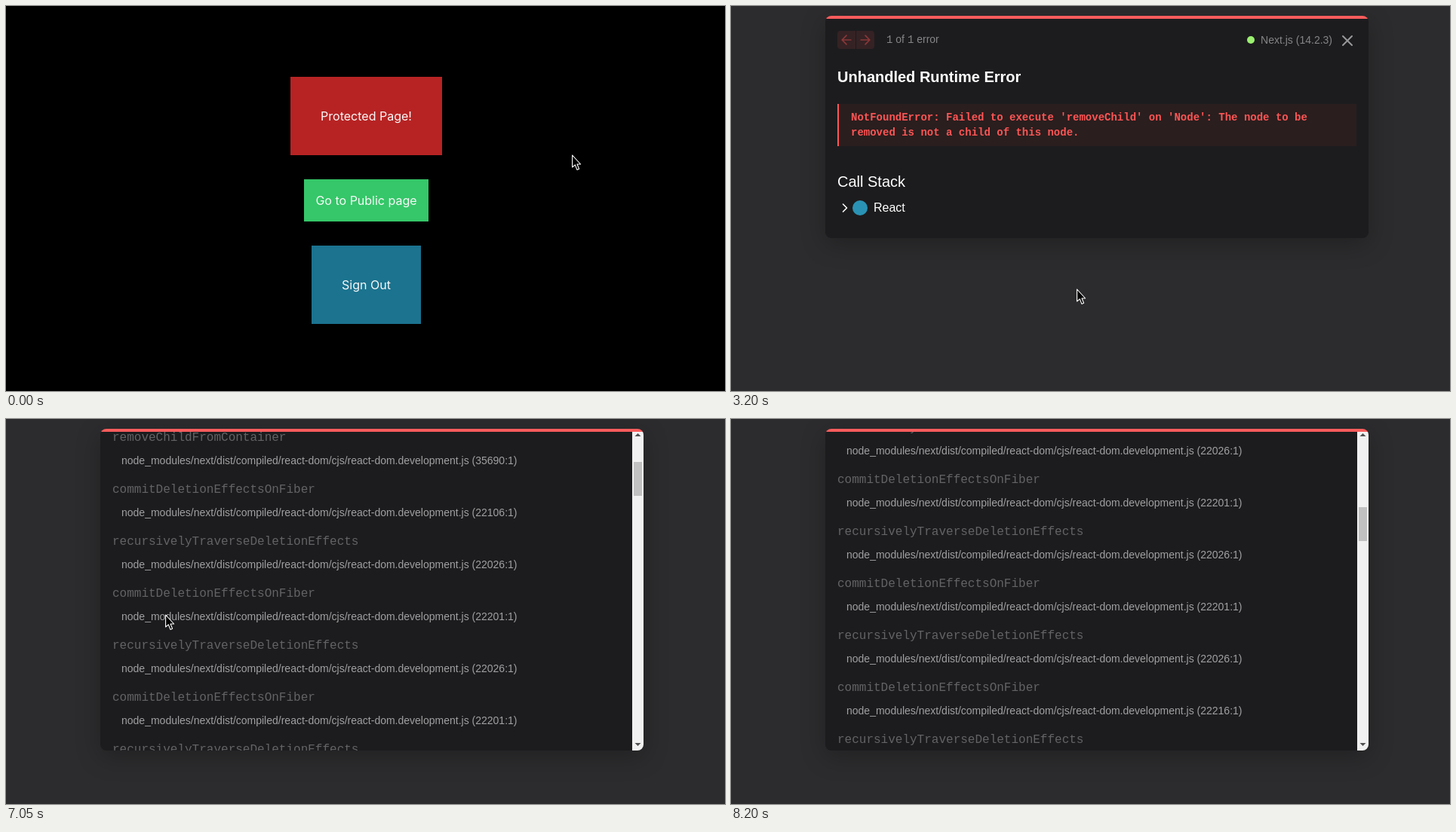
Recreate the animation shown at these times as an HTML page with a canvas. Size 953 by 511 pixels, loop 9050 ms.

```html
<!DOCTYPE html>
<html lang="en">
<head>
<meta charset="utf-8">
<title>Sign out error</title>
<style>
  html, body { margin: 0; width: 100%; height: 100%; overflow: hidden; background: #000; }
  canvas { display: block; }
</style>
</head>
<body>
<canvas id="stage" width="953" height="511"></canvas>
<script>
const ctx = document.getElementById('stage').getContext('2d');
const LOOP = 9050, STEP = 50;
const SANS = '"Liberation Sans", Arial, sans-serif';
const MONO = '"Liberation Mono", "Courier New", monospace';
const RED = '#ff5555', GREY = '#858587';

const smooth = p => p * p * (3 - 2 * p);
const progress = (t, from, to) => Math.min(1, Math.max(0, (t - from) / (to - from)));

function rect(x, y, w, h, color, radius = 0) {
  ctx.fillStyle = color;
  ctx.beginPath();
  ctx.roundRect(x, y, w, h, radius);
  ctx.fill();
}

function circle(x, y, r, color) {
  ctx.fillStyle = color;
  ctx.beginPath();
  ctx.arc(x, y, r, 0, 2 * Math.PI);
  ctx.fill();
}

function text(str, x, y, font, color, align = 'left') {
  ctx.font = font;
  ctx.fillStyle = color;
  ctx.textAlign = align;
  ctx.fillText(str, x, y);
}

function strokePath(d, x, y, color, width) {
  ctx.save();
  ctx.translate(x, y);
  ctx.strokeStyle = color;
  ctx.lineWidth = width;
  ctx.lineCap = ctx.lineJoin = 'round';
  ctx.stroke(new Path2D(d));
  ctx.restore();
}

// Page with three buttons

function drawPage() {
  const button = (label, x, y, w, h, color) => {
    rect(x, y, w, h, color);
    text(label, 477.5, y + h / 2 + 6, '16px Inter, sans-serif', '#f8f8f8', 'center');
  };
  button('Protected Page!', 377, 94, 201, 104, '#b72323');
  button('Go to Public page', 395, 230, 165, 56, '#35c769');
  button('Sign Out', 405, 318, 145, 104, '#1b738f');
}

// Error dialog

function drawHeader(right) {
  rect(141, 33, 24, 24, 'rgba(255,85,85,.11)', [4, 0, 0, 4]);
  rect(166, 33, 24, 24, 'rgba(255,85,85,.11)', [0, 4, 4, 0]);
  const arrowColor = 'rgba(255,85,85,.42)';
  strokePath('M0-5.8 -5.8 0 0 5.8M5.8 0H-5.8', 153, 45, arrowColor, 1.7);
  strokePath('M0-5.8 5.8 0 0 5.8M-5.8 0H5.8', 178, 45, arrowColor, 1.7);

  text('1', 206, 49, '14px ' + MONO, GREY);
  text('of', 218.3, 49, '14px ' + SANS, GREY);
  text('1', 233.9, 49, '14px ' + MONO, GREY);
  text('error', 246.2, 49, '14px ' + SANS, GREY);

  circle(right - 140, 45, 5, '#9bf070');
  text('Next.js (14.2.3)', right - 32, 50, '14px ' + SANS, GREY, 'right');
  strokePath('M-6-6 6 6M6-6 -6 6', right - 12, 46, '#98989a', 2);
}

function drawMessage(right) {
  text('Unhandled Runtime Error', 141, 101, 'bold 20px ' + SANS, '#fff');
  rect(141, 130, right - 141, 56, '#2a1e1e');
  rect(141, 130, 2, 56, RED);
  const bold = 'bold 14px ' + MONO;
  text("NotFoundError: Failed to execute 'removeChild' on 'Node': The node to be", 159, 152, bold, RED);
  text('removed is not a child of this node.', 159, 172, bold, RED);
}

function drawCallStack(open) {
  text('Call Stack', 141, 240, '20px ' + SANS, '#fff');
  strokePath(open ? 'M-5-2.5 0 2.5 5-2.5' : 'M-2.5-5 2.5 0 -2.5 5', 151, 268, '#fff', 1.6);
  circle(171, 268, 10, '#2a93b5');
  text('React', 189, 273, '16px ' + SANS, '#fff');
  if (!open) return;

  const special = { 0: ['removeChildFromContainer', 35690], 1: ['', 22106], 13: ['', 22216] };
  for (let i = 0; i < 22; i++) {
    const [name, line] = special[i] || [];
    const commit = i % 2 === 1;
    const y = 304 + 69 * i;
    text(name || (commit ? 'commitDeletionEffectsOnFiber' : 'recursivelyTraverseDeletionEffects'),
      141, y, '16px ' + MONO, '#636366');
    text(`node_modules/next/dist/compiled/react-dom/cjs/react-dom.development.js (${line || (commit ? 22201 : 22026)}:1)`,
      153, y + 31, '14px ' + SANS, '#a0a0a2');
  }
}

function drawScrollbar(scroll) {
  const triangle = (y, dir, color) => {
    ctx.fillStyle = color;
    ctx.fill(new Path2D(`M833.5 ${y + 2 * dir}H841.5L837.5 ${y - 2 * dir}Z`));
  };
  rect(830, 17, 15, 423, '#f1f1f1');
  triangle(21, 1, scroll ? '#505050' : '#a3a3a3');
  triangle(432, -1, '#505050');
  rect(832, Math.round(28 + 89 * scroll / 840), 11, 45, '#c1c1c1');
}

function drawDialog(open, scroll) {
  const height = open ? 427 : 295;
  const right = open ? 814 : 829;
  rect(0, 0, 953, 511, '#2c2c2e');
  ctx.save();
  ctx.shadowColor = 'rgba(0,0,0,.25)';
  ctx.shadowBlur = 32;
  ctx.shadowOffsetY = 8;
  rect(125, 13, 720, height, '#1c1c1e', 8);
  ctx.restore();

  ctx.save();
  ctx.beginPath();
  ctx.roundRect(125, 13, 720, height, 8);
  ctx.clip();
  ctx.save();
  ctx.translate(0, -scroll);
  drawHeader(right);
  drawMessage(right);
  drawCallStack(open);
  ctx.restore();
  if (open) drawScrollbar(scroll);
  rect(125, 13, 720, 4, '#fa5c5c');
  ctx.restore();
}

function scrollAt(t) {
  const fast = progress(t, 6900, 7250);
  const tail = progress(t, 7250, 7450);
  return Math.round(698 * smooth(fast) + 142 * (1 - (1 - tail) ** 2));
}

// Mouse pointer

const ARROW = 'M.6 1V17L4.3 13.8 6.9 20.4 9.6 19.3 7 13H11.6Z';
const HAND = 'M-1.2 9V.4Q-1.2-1.4 .4-1.4T2.1 .4V5Q4.2 4 4.8 5.6 6.8 4.7 7.5 6.4' +
  'Q10.4 5.8 10.4 8.5V12Q10.2 14 8.8 15.3V17.4H.2V15.5L-4.9 9.8Q-5.6 8.2-4 7.7-2.6 7.6-1.2 9Z';

const STOPS = [
  [1350, 471, 369, HAND], [1400, 464, 372, HAND], [1450, 459, 375, HAND],
  [2350, 458, 375, ARROW], [4500, 389, 350, ARROW], [4600, 320, 325, ARROW],
  [4900, 159, 281, ARROW], [5200, 149, 268, HAND], [6750, 158, 268, HAND],
  [6900, 211, 259, ARROW], [7900, 188, 218, ARROW], [7950, 136, 128, ARROW],
  [8050, 82, 33, ARROW]
];

function pointerAt(t) {
  if (t >= 8200) return null;
  if (t >= 1350) return STOPS.findLast(stop => t >= stop[0]).slice(1);
  const p = smooth(progress(t, 400, 1350));
  const x = Math.round(750 - 279 * p), y = Math.round(197 + 172 * p);
  return [x, y, x < 550 && y >= 318 ? HAND : ARROW];
}

function drawPointer(t) {
  const pointer = pointerAt(t);
  if (!pointer) return;
  const [x, y, shape] = pointer;
  ctx.save();
  ctx.translate(x, y);
  ctx.fillStyle = '#000';
  ctx.fill(new Path2D(shape));
  ctx.restore();
  strokePath(shape, x, y, '#fff', 1.1);
}

function draw(now) {
  const t = Math.floor((now % LOOP) / STEP) * STEP;
  rect(0, 0, 953, 511, '#000');
  if (t < 2250) drawPage();
  if (t >= 3200) drawDialog(t >= 5300, scrollAt(t));
  drawPointer(t);
}

function tick() {
  draw(performance.now());
  requestAnimationFrame(tick);
}
tick();
</script>
</body>
</html>
```
